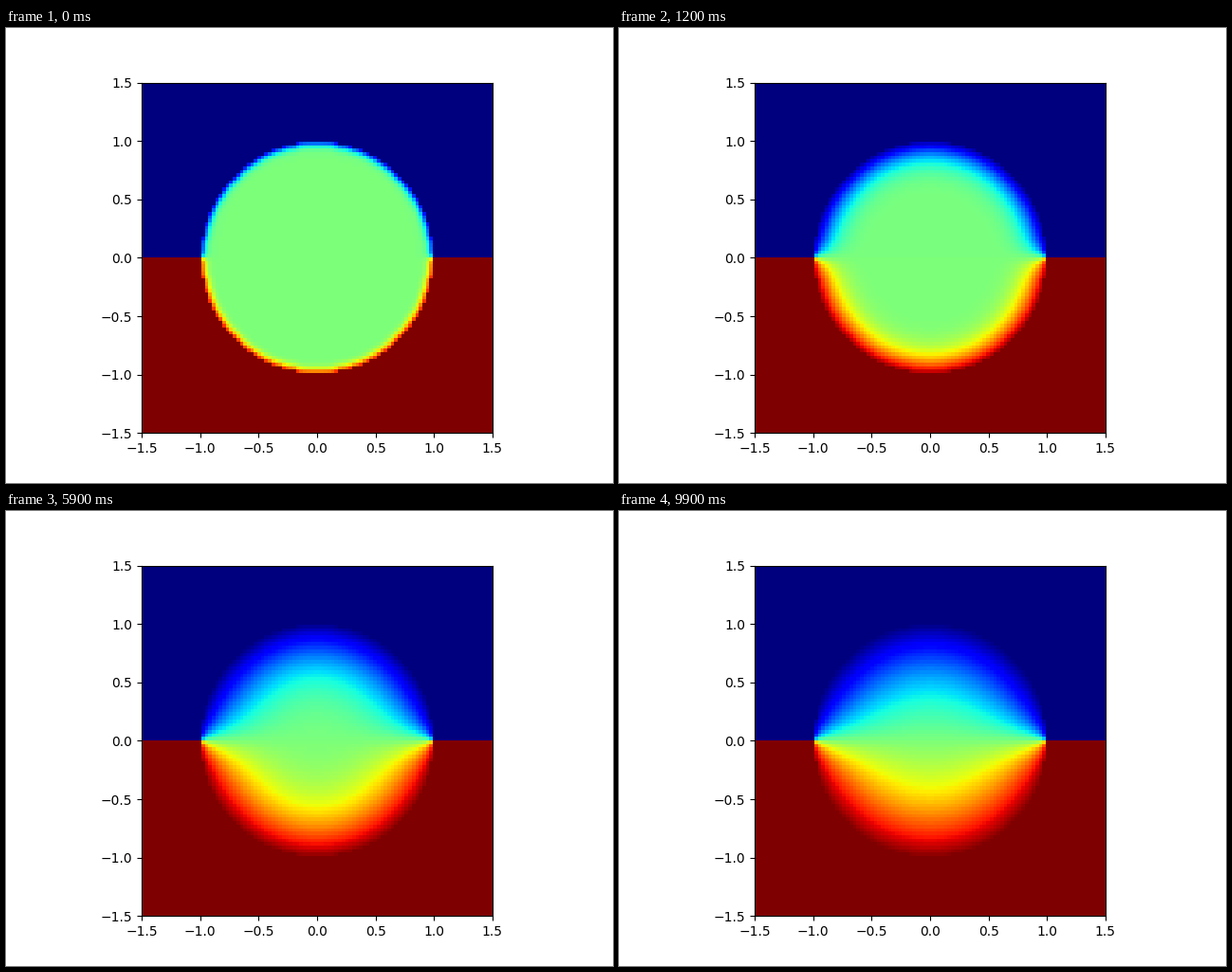
Animation of 640x480 px, one loop 10 s. Source, as a matplotlib script:

```python
import numpy as np
import matplotlib.pyplot as plt
from matplotlib.animation import FuncAnimation

N = 100              # grid points per side
FRAMES = 100
INTERVAL = 100       # ms
HALF = 1.5           # half width of the domain
DIFFUSION = 0.00105  # diffusivity times time, per frame
SUBSTEPS = 5
HOLDS = {8, 11, 13, 15, 90}  # frames that repeat the one before

axis = np.linspace(-HALF, HALF, N)
X, Y = np.meshgrid(axis, axis)
INSIDE = X**2 + Y**2 < 1
RATE = DIFFUSION / SUBSTEPS / (axis[1] - axis[0])**2


def diffuse(u):
    """Advance the heat equation by one frame; cells outside the disc stay fixed."""
    for _ in range(SUBSTEPS):
        lap = sum(np.roll(u, s, a) for a in (0, 1) for s in (1, -1)) - 4 * u
        u = np.where(INSIDE, u + RATE * lap, u)
    return u


def solve():
    u = np.where(INSIDE, 0.0, -np.sign(Y))
    states = []
    for i in range(FRAMES):
        u = diffuse(u)
        states.append(states[-1] if i in HOLDS else u)
    return states


states = solve()

fig, ax = plt.subplots(figsize=(6.4, 4.8), dpi=100)
image = ax.imshow(states[0], cmap="jet", vmin=-1, vmax=1, origin="lower",
                  interpolation="nearest", extent=(-HALF, HALF, -HALF, HALF))
ticks = np.arange(-HALF, HALF + 0.1, 0.5)
ax.set_xticks(ticks)
ax.set_yticks(ticks)


def update(i):
    image.set_data(states[i])
    return [image]


anim = FuncAnimation(fig, update, frames=FRAMES, interval=INTERVAL, repeat=True)
plt.show()
```
